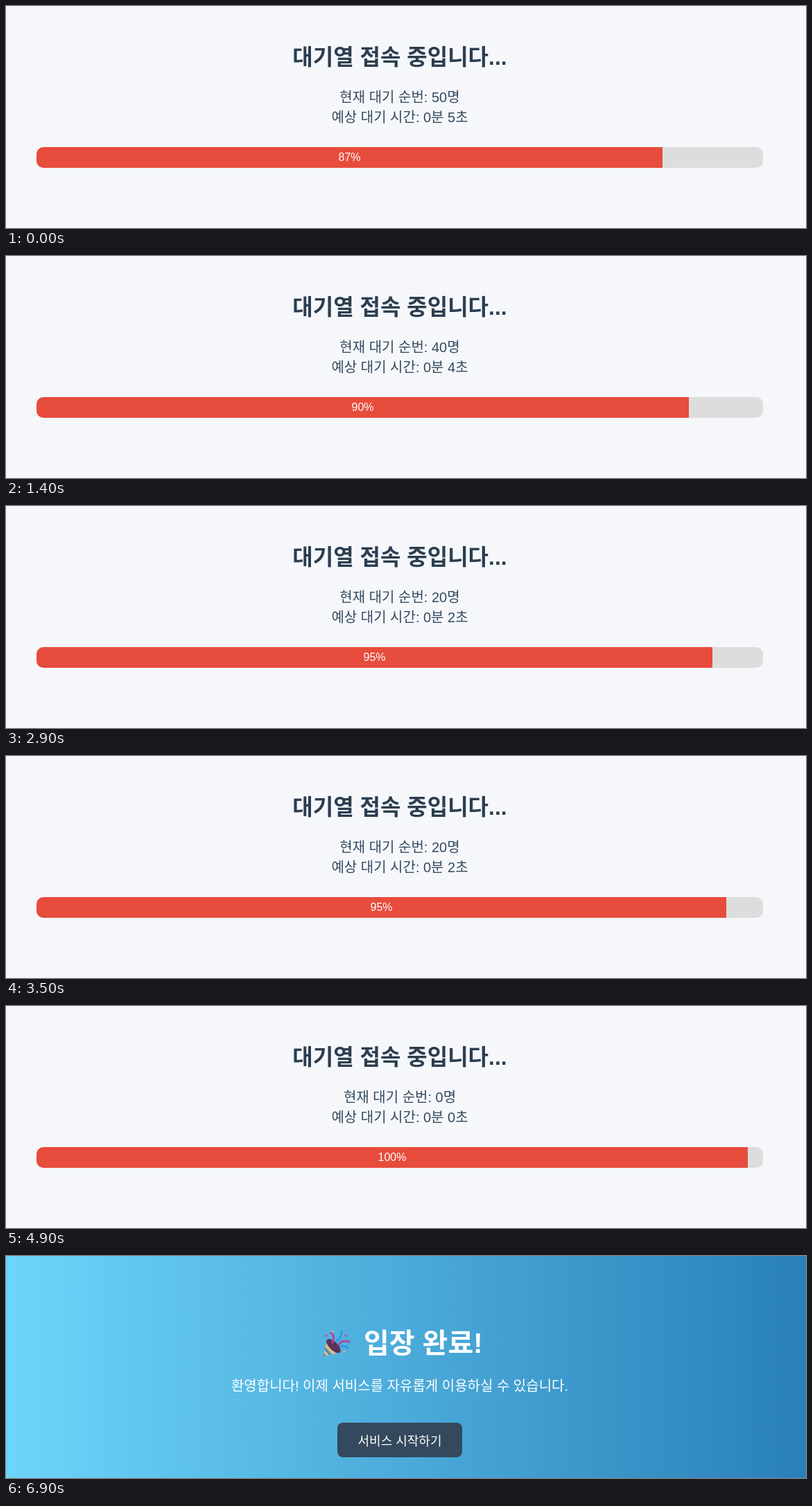
Write an HTML page that moves like this. It is 1154 px wide and 321 px high and loops after 7900 ms.

```html
<!DOCTYPE html>
<html lang="ko">
<head>
<meta charset="utf-8">
<title>대기열</title>
<style>
  html, body { margin: 0; width: 100%; height: 100%; overflow: hidden; background: #f5f7fb; }
  svg { display: block; }
  text { font: 20px "Liberation Sans", Arial, "Noto Sans CJK KR", "Noto Sans CJK", sans-serif; text-anchor: middle; fill: #34495e; }
  #waiting .title { font-size: 32px; font-weight: bold; fill: #2c3e50; }
  #percent { font-size: 16px; fill: #fff; }
  #welcome text { fill: #fff; }
  #welcome .title { font-size: 40px; font-weight: bold; text-anchor: start; }
  #welcome .button { font-size: 18px; }
  .streamer { fill: none; stroke-width: 3; stroke-linecap: round; }
</style>
</head>
<body>
<svg width="1154" height="321" viewBox="0 0 1154 321">
  <defs>
    <linearGradient id="sky">
      <stop stop-color="#6dd5fa"/>
      <stop offset="1" stop-color="#2980b9"/>
    </linearGradient>
    <clipPath id="track"><rect x="44" y="204" width="1048" height="30" rx="10"/></clipPath>
    <clipPath id="cone"><path d="M457 146 463 121Q475 125 482 139Z"/></clipPath>
  </defs>

  <g id="waiting">
    <text class="title" x="568" y="85">대기열 접속 중입니다...</text>
    <text id="position" x="568" y="139"></text>
    <text id="remaining" x="568" y="168"></text>
    <g clip-path="url(#track)">
      <rect x="44" y="204" width="1048" height="30" fill="#ddd"/>
      <rect id="fill" x="44" y="204" height="30" fill="#e74c3c"/>
    </g>
    <text id="percent" y="224"></text>
  </g>

  <g id="welcome">
    <rect width="1154" height="321" fill="url(#sky)"/>
    <g id="popper">
      <g clip-path="url(#cone)">
        <path d="M455 148V118H485V148Z" fill="#d9b98a"/>
        <path d="M454 138 464 150M456 130 475 150M459 121 485 147" stroke="#3f8fc4" stroke-width="3.5"/>
      </g>
      <ellipse cx="472.500" cy="130" rx="13" ry="6" transform="rotate(45 472.500 130)" fill="#5b3557"/>
      <path class="streamer" d="M469 111Q475 117 471 125" stroke="#b8479b"/>
      <path class="streamer" d="M484 109Q485 118 477 123" stroke="#2f9be0"/>
      <path class="streamer" d="M480 128Q485 121 495 124" stroke="#b8479b"/>
      <path class="streamer" d="M482 131Q488 129 494 133" stroke="#2f9be0"/>
      <g fill="#c74a9f">
        <circle cx="462" cy="115" r="1.800"/><circle cx="490" cy="115" r="1.800"/>
      </g>
      <g fill="#d9b98a">
        <circle cx="471" cy="109" r="1.500"/><circle cx="488" cy="138" r="1.600"/>
      </g>
    </g>
    <text class="title" x="515.900" y="140">입장 완료!</text>
    <text x="568" y="195">환영합니다! 이제 서비스를 자유롭게 이용하실 수 있습니다.</text>
    <rect x="478" y="241" width="180" height="50" rx="8" fill="#34495e"/>
    <text class="button" x="568" y="274">서비스 시작하기</text>
  </g>
</svg>
<script>
const LOOP = 7900, FRAME = 100, WELCOME_AT = 6900;
const FIRST_UPDATE = -275, UPDATE_PERIOD = 1006, TRANSITION = 1000;
const QUEUE_TOTAL = 400, QUEUE_START = 50, QUEUE_STEP = 10;
const BAR_X = 44, BAR_WIDTH = 1048;
const $ = id => document.getElementById(id);

// CSS "ease": cubic-bezier(.25, .1, .25, 1)
function ease(x) {
  if (x >= 1) return 1;
  let low = 0, high = 1;
  for (let i = 0; i < 24; i++) {
    const mid = (low + high) / 2;
    if (0.75 * mid * (1 - mid) + mid ** 3 < x) low = mid; else high = mid;
  }
  const t = low, u = 1 - t;
  return 0.3 * t * u * u + 3 * t * t * u + t ** 3;
}

const progressFor = queue => 1 - queue / QUEUE_TOTAL;

function draw(time) {
  const welcome = time >= WELCOME_AT;
  $("welcome").style.display = welcome ? "" : "none";
  $("waiting").style.display = welcome ? "none" : "";
  if (welcome) return;

  const update = Math.min(5, Math.floor((time - FIRST_UPDATE) / UPDATE_PERIOD));
  const queue = QUEUE_START - update * QUEUE_STEP;
  const elapsed = time - FIRST_UPDATE - update * UPDATE_PERIOD;
  const from = progressFor(queue + QUEUE_STEP), to = progressFor(queue);
  const width = Math.round(BAR_WIDTH * (from + (to - from) * ease(elapsed / TRANSITION)));

  $("position").textContent = `현재 대기 순번: ${queue}명`;
  $("remaining").textContent = `예상 대기 시간: 0분 ${queue / 10}초`;
  $("percent").textContent = `${Math.floor(to * 100)}%`;
  $("percent").setAttribute("x", BAR_X + width / 2);
  $("fill").setAttribute("width", width);
}

const start = performance.now();
function tick() {
  const time = (performance.now() - start) % LOOP;
  draw(Math.floor(time / FRAME) * FRAME);
  requestAnimationFrame(tick);
}
tick();
</script>
</body>
</html>
```
